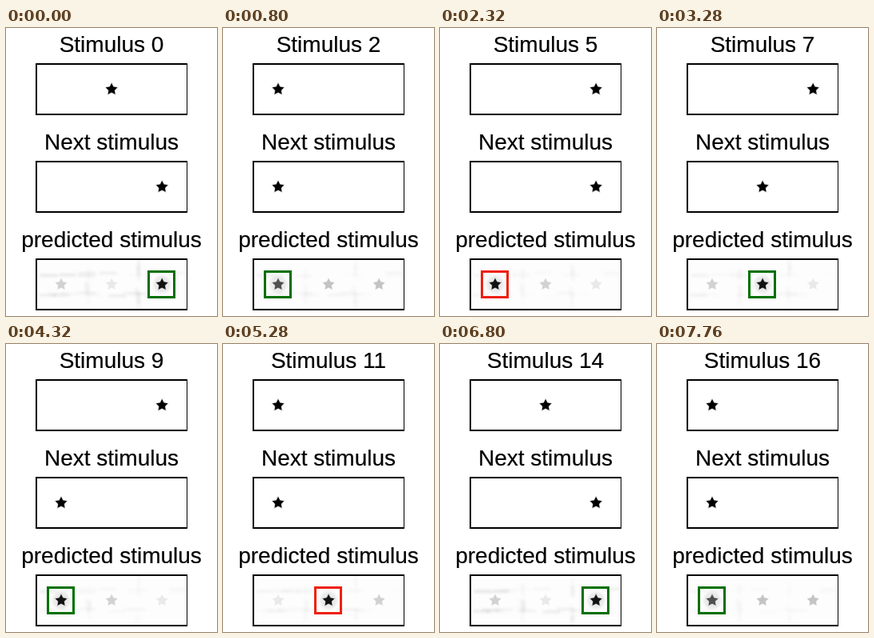
These frames come from a looping animation (264 px wide and 360 px high, 8000 ms). An HTML page:

```html
<!DOCTYPE html>
<html lang="en">
<head>
<meta charset="utf-8">
<title>Stimulus prediction</title>
<style>
  html, body { margin: 0; width: 100%; height: 100%; overflow: hidden; background: #fff; }
  svg { display: block; width: 264px; height: 360px; }
  text {
    font: 28px "Liberation Sans", Arial, sans-serif; text-anchor: middle;
    fill: #000; stroke: #000; stroke-width: .2;
  }
  .panel { fill: #000; fill-rule: evenodd; shape-rendering: crispEdges; }
  .star { fill: #000; stroke: #000; stroke-opacity: .2; stroke-width: 1.4; filter: url(#edge); }
  .mark { fill: none; stroke-width: 3; shape-rendering: crispEdges; }
</style>
</head>
<body>
<svg id="stage" viewBox="0 0 264 360">
  <defs>
    <filter id="edge" x="-30%" y="-30%" width="160%" height="160%"><feGaussianBlur stdDeviation=".5"/></filter>
    <filter id="soft" x="-20%" y="-20%" width="140%" height="140%"><feGaussianBlur stdDeviation="1.8"/></filter>
    <clipPath id="inside"><rect x="38" y="288" width="188" height="63"/></clipPath>
  </defs>
</svg>
<script>
const LOOP = 8000, STEP = 500, TICK = 80, FIRST = 320;
const SLOTS = "LCR";
const shown = "CRLLCRRRCRLLLRCRLL";    // stimulus at each step, plus the one after the last
const predicted = "RLLCRLRCRLLCRCRLL";

const stage = document.getElementById("stage");
const slotX = i => 69 + 63.1 * i;

function add(tag, attrs, parent = stage) {
  const el = document.createElementNS("http://www.w3.org/2000/svg", tag);
  for (const key in attrs) el.setAttribute(key, attrs[key]);
  parent.appendChild(el);
  return el;
}

function label(y, words) {
  const el = add("text", { x: 132, y });
  el.textContent = words;
  return el;
}

function random(seed) {
  return () => (seed = (seed * 16807) % 2147483647) / 2147483647;
}

const starPoints = Array.from({ length: 10 }, (_, i) => {
  const r = i % 2 ? 3.9 : 7.6, a = Math.PI * (i / 5 - 0.5);
  return (r * Math.cos(a)).toFixed(2) + "," + (r * Math.sin(a)).toFixed(2);
}).join(" ");

function star(slot, y) {
  const el = add("polygon", { class: "star", points: starPoints });
  el.place = i => el.setAttribute("transform", `translate(${slotX(i)} ${y})`);
  el.place(slot);
  return el;
}

// Faint haze of the prediction: soft patches along the borders of the slots
const haze = add("g", { "clip-path": "url(#inside)" });
add("rect", { x: 38, y: 288, width: 188, height: 63, fill: "#fdfdfd" }, haze);
const smudges = add("g", { filter: "url(#soft)" }, haze);
const rand = random(77);
for (let i = 0; i < 36; i++) {
  const flat = i % 3 > 0, side = i % 2;
  add("rect", flat
    ? { x: 38 + 170 * rand(), y: 304 + 25 * side + 4 * rand(), width: 22, height: 4 }
    : { x: 98 + 63 * side + 4 * rand(), y: 288 + 52 * rand(), width: 5, height: 14 }, smudges);
}
const glow = add("circle", { cy: 320.5, r: 11, opacity: 0.07, filter: "url(#soft)" }, haze);

const title = label(30, "");
label(152, "Next stimulus");
label(274, "predicted stimulus");
for (const y of [44, 166, 288])
  add("path", { class: "panel", d: `M37 ${y}h190v65h-190z m2 2h187v61h-187z` });

const current = star(0, 76.7);
const next = star(0, 198.7);
const guesses = [0, 1, 2].map(i => star(i, 320.5));
const mark = add("rect", { class: "mark", y: 304.5, width: 32, height: 32 });

// The guess is strong, less so for a repeat; the current slot is the weakest rival
function strength(slot, now, guess) {
  const main = now === guess ? 0.66 : 0.92;
  if (slot === guess) return main;
  return (slot === now ? 0.06 : 0.15) + 0.2 * (1 - main);
}

function show(n) {
  const now = shown[n], guess = predicted[n], truth = shown[n + 1];
  const at = SLOTS.indexOf(guess), roll = random(1000 + n * 321);
  title.textContent = "Stimulus " + n;
  current.place(SLOTS.indexOf(now));
  next.place(SLOTS.indexOf(truth));
  guesses.forEach((el, i) => el.setAttribute("opacity", strength(SLOTS[i], now, guess)));
  mark.setAttribute("x", 52.5 + 63 * at);
  mark.setAttribute("stroke", guess === truth ? "#007000" : "#ee2010");
  glow.setAttribute("cx", slotX(at));
  const depth = guess === "R" ? 0.05 : 0.025;
  for (const el of smudges.children) el.setAttribute("opacity", depth * roll());
}

// A new step every 500 ms, held back to the 80 ms clock
const startOf = n => Math.floor((FIRST + STEP * (n - 1)) / TICK) * TICK;

let last = -1;
function tick() {
  const t = performance.now() % LOOP;
  let n = 0;
  while (n + 1 < predicted.length && startOf(n + 1) <= t) n++;
  if (n !== last) show(last = n);
  requestAnimationFrame(tick);
}
tick();
</script>
</body>
</html>
```
